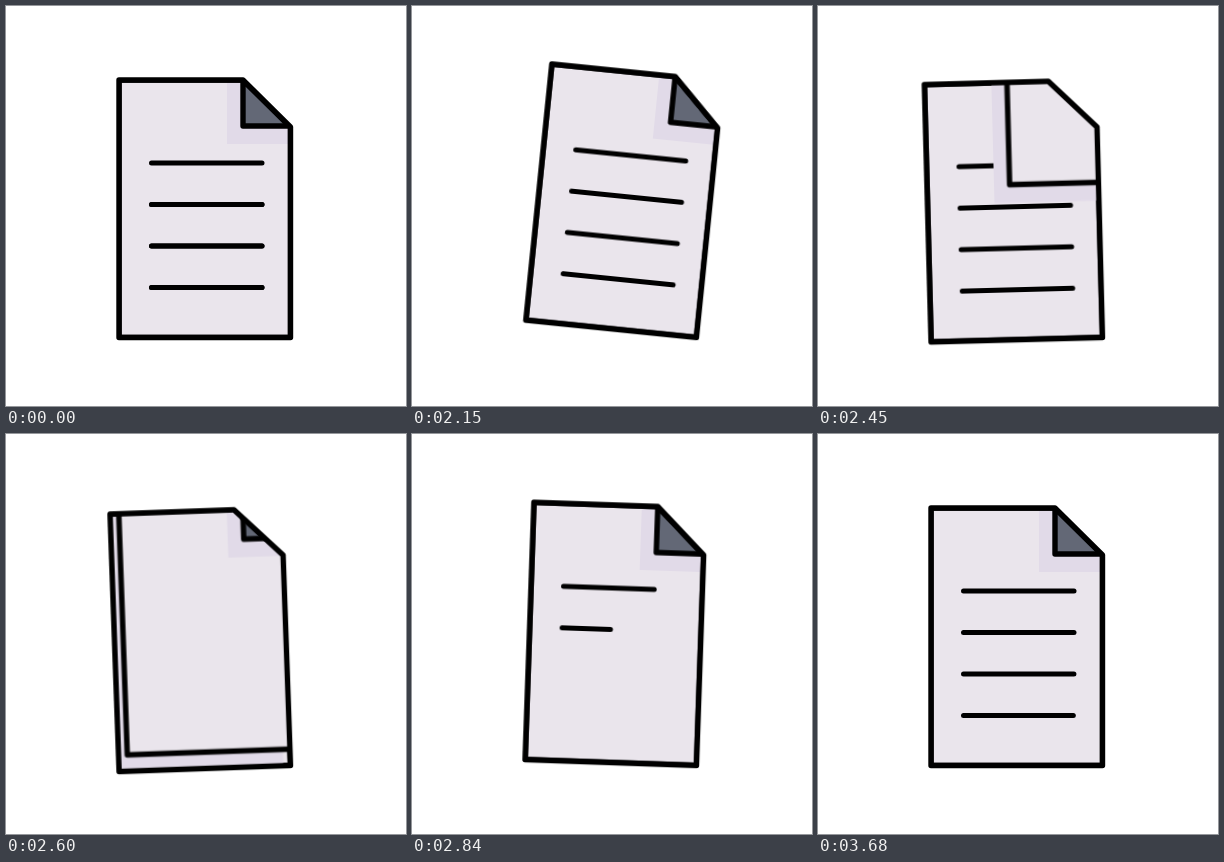
An HTML page that plays this animation: 400x400 px, repeating every 4430 ms.

```html
<!DOCTYPE html>
<html lang="en">
<head>
<meta charset="utf-8">
<title>New page</title>
<style>
  html, body { margin: 0; width: 100%; height: 100%; overflow: hidden; background: #fff; }
  svg { display: block; width: 100vw; height: 100vh; }

  .ink { fill: none; stroke: #000; stroke-width: 5.4; stroke-linecap: round; stroke-linejoin: round; }
  .paper { fill: #eae5ec; }
  .shade { fill: #e1dae8; }
  .fold { fill: #636876; }
  .text { stroke-width: 5; }

  .page, .sheet, .fresh path { animation: 4430ms linear infinite; }
  .page { transform-box: view-box; transform-origin: 284.5px 331px; animation-name: swing; }
  .sheet { animation-name: slide; }
  .fresh path {
    stroke-dasharray: 1 2;
    animation-name: write;
    animation-delay: calc(var(--i) * 150ms - 4430ms);
  }

  /* the page rocks on its lower right corner */
  @keyframes swing {
    0%, 45.37% { transform: rotate(0deg); animation-timing-function: cubic-bezier(.39, .575, .565, 1); }
    51.24% { transform: rotate(7.4deg); animation-timing-function: cubic-bezier(.445, .05, .55, .95); }
    56.88% { transform: rotate(-3.2deg); animation-timing-function: cubic-bezier(.445, .05, .55, .95); }
    62.53% { transform: rotate(2.05deg); animation-timing-function: cubic-bezier(.47, 0, .745, .715); }
    70.88%, 100% { transform: rotate(0deg); }
  }

  /* a blank sheet covers it from the upper right */
  @keyframes slide {
    0%, 51.92% { transform: translate(149px, -280px); animation-timing-function: cubic-bezier(.45, .1, .3, 1); }
    61.22%, 100% { transform: translate(0, 0); }
  }

  @keyframes write {
    0%, 58.96% { stroke-dashoffset: 1; visibility: hidden; animation-timing-function: cubic-bezier(.16, 1, .3, 1); }
    79.95%, 100% { stroke-dashoffset: 0; visibility: visible; }
  }
</style>
</head>
<body>
<svg viewBox="0 0 400 400">
  <defs>
    <path id="shape" d="M113 74H237L284.5 121V331.5H113Z"/>
    <clipPath id="inside"><use href="#shape"/></clipPath>
    <g id="blank">
      <use href="#shape" class="shade" x="-16" y="18"/>
      <use href="#shape" class="paper"/>
      <path class="shade" d="M221 74H284.5V138H221Z"/>
      <path class="fold" d="M237 74V120H284.5Z"/>
      <path class="ink" d="M237 74V120H284.5Z"/>
      <use href="#shape" class="ink"/>
    </g>
  </defs>
  <g class="page">
    <g clip-path="url(#inside)">
      <use href="#blank"/>
      <path class="ink text" d="M145.5 157H256M145.5 198.5H256M145.5 240H256M145.5 281.5H256"/>
      <g class="sheet"><use href="#blank"/></g>
    </g>
    <g class="ink text fresh">
      <path pathLength="1" style="--i:0" d="M145.5 157H256"/>
      <path pathLength="1" style="--i:1" d="M145.5 198.5H256"/>
      <path pathLength="1" style="--i:2" d="M145.5 240H256"/>
      <path pathLength="1" style="--i:3" d="M145.5 281.5H256"/>
    </g>
    <use href="#shape" class="ink"/>
  </g>
</svg>
</body>
</html>
```
